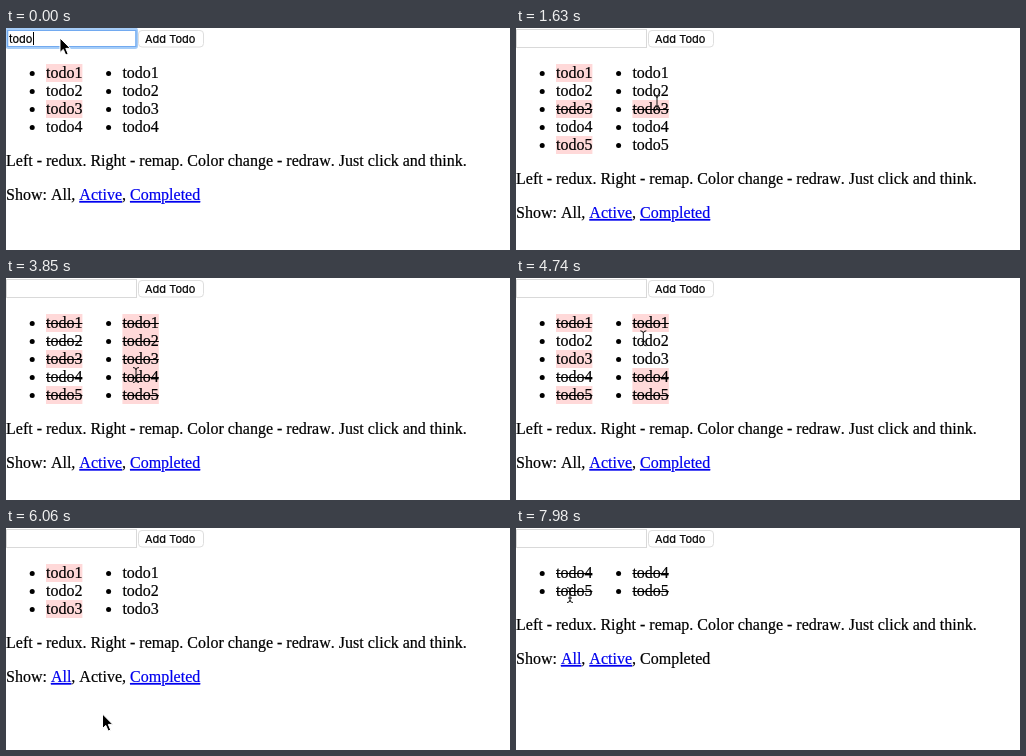
Write an HTML page that moves like this. It is 504 px wide and 222 px high and loops after 8000 ms.

```html
<!DOCTYPE html>
<html lang="en">
<head>
<meta charset="utf-8">
<title>Todo lists</title>
<style>
  html, body { margin: 0; width: 100%; height: 100%; overflow: hidden; background: #fff; }
  svg { display: block; width: 504px; height: 222px; }
  text { font: 16px "Liberation Serif", serif; font-kerning: none; stroke: #000; stroke-width: .2px; }
  .ui { font: 11px Inter, sans-serif; }
  .link { fill: #00e; stroke: #00e; text-decoration: underline; }
</style>
</head>
<body>
<svg id="stage" viewBox="0 0 504 222"></svg>
<script>
const LOOP = 8000, TICK = 147.7;
const ROW = 18, LIST_TOP = 36, ITEM_WIDTH = 36.4;
const COLUMNS = [40, 116.4];

// Moments below are counted in ticks.
const TYPED = 2, ADDED = 4, SHOW_ACTIVE = 41, SHOW_COMPLETED = 49;
const FIRST_CLICK = 11, CLICK_GAP = 3.4, CLICKS = 8;
const POINTER_STOPS = [
  { at: 5, x: 54, y: 10 },      // input
  { at: 9, x: 173, y: 48 },
  { at: 11, x: 141, y: 75 },    // todo3
  { at: 18, x: 133, y: 50 },    // todo1
  { at: 20, x: 130, y: 115 },   // todo5
  { at: 23, x: 130, y: 115 },
  { at: 26, x: 130, y: 97 },    // todo4
  { at: 35, x: 126, y: 42 },    // todo1
  { at: 37, x: 122, y: 198 },
  { at: 41, x: 96.5, y: 186 },  // Active
  { at: 42, x: 96.5, y: 186 },
  { at: 49, x: 167, y: 155 },   // Completed
  { at: 50, x: 167, y: 155 },
  { at: 54, x: 54, y: 67 }
];

const rect = (x, y, w, h, fill, extra = "") =>
  `<rect x="${x}" y="${y}" width="${w}" height="${h}" fill="${fill}" ${extra}/>`;
const text = (x, y, content, cls = "") => `<text x="${x}" y="${y}" class="${cls}">${content}</text>`;

// The clicks climb the right list at a steady pace and wrap from todo1 to todo5.
function clickedIds(tick) {
  const count = Math.floor((tick - FIRST_CLICK) / CLICK_GAP) + 1;
  return Array.from({ length: Math.max(0, Math.min(CLICKS, count)) }, (_, k) => 5 - (k + 2) % 5);
}

function stateAt(tick) {
  const clicks = clickedIds(tick);
  const filter = tick >= SHOW_COMPLETED ? "Completed" : tick >= SHOW_ACTIVE ? "Active" : "All";
  const renders = 4 + (tick >= ADDED) + clicks.length + (filter !== "All");
  const items = [];
  for (let id = 1; id <= (tick >= ADDED ? 5 : 4); id++) {
    const done = clicks.filter(clicked => clicked === id).length % 2 === 1;
    if (filter !== "All" && done !== (filter === "Completed")) continue;
    const fresh = filter === "Completed";
    // The left list redraws every item each time, the right one only the toggled item.
    items.push({ id, done, tinted: [!fresh && (renders - id) % 2 === 1, !fresh && done] });
  }
  return { filter, items };
}

function drawForm(tick) {
  const focused = tick < FIRST_CLICK;
  const value = tick >= ADDED ? "" : tick >= TYPED ? "todo5" : "todo";
  const caret = Math.floor(3 + 6.2 * value.length);
  const field = focused
    ? rect(1, 1, 129.5, 18.5, "#fff", 'rx="1.5" stroke="#a6cdf8" stroke-width="3"') +
      rect(1.5, 2.5, 128.5, 16, "none", 'stroke="#72aaf0"')
    : rect(.5, 1.5, 130, 18, "#fff", 'stroke="#d9d9d9"');
  return field + text(3, 15, value, "ui") +
    (focused ? rect(caret, 4, 1, 13, "#000") : "") +
    rect(132.5, 2.5, 65, 16.5, "#fff", 'rx="3.5" stroke="#dedede"') +
    text(139, 15, "Add Todo", "ui");
}

function drawItem({ id, done, tinted }, row) {
  const top = LIST_TOP + row * ROW;
  return COLUMNS.map((x, column) =>
    (tinted[column] ? rect(x, top, ITEM_WIDTH, ROW, "#ffd9d9") : "") +
    `<circle cx="${x - 13.8}" cy="${top + 9.5}" r="2.5"/>` +
    text(x, top + 14, "todo" + id) +
    (done ? rect(x, top + 9, ITEM_WIDTH, 1, "#000") : "")).join("");
}

function drawFooter(filter, listBottom) {
  const links = ["All", "Active", "Completed"]
    .map(name => name === filter ? name : `<tspan class="link">${name}</tspan>`).join(", ");
  return text(0, listBottom + 30, "Left - redux. Right - remap. Color change - redraw. Just click and think.") +
    text(0, listBottom + 64, "Show: " + links);
}

function pointerAt(tick) {
  const next = POINTER_STOPS.findIndex(stop => stop.at >= tick);
  const to = POINTER_STOPS[next], from = POINTER_STOPS[next - 1] ?? to;
  const k = to === from ? 1 : (tick - from.at) / (to.at - from.at);
  return [from.x + (to.x - from.x) * k, from.y + (to.y - from.y) * k];
}

function drawPointer(tick, listBottom) {
  const [x, y] = pointerAt(tick);
  const overItem = y >= LIST_TOP && y < listBottom && COLUMNS.some(left => x >= left && x <= left + ITEM_WIDTH);
  const overSentence = y >= listBottom + 16 && y < listBottom + 34;
  const shape = overItem || overSentence
    ? '<path d="M-3-7.5Q0-7.5 0-5V5Q0 7.5 3 7.5M3-7.5Q0-7.5 0-5M0 5Q0 7.5-3 7.5M-2 3H2" fill="none" stroke="#111"/>'
    : '<path d="M0 0V14.5L3.3 11.4 5.7 17 8.2 16 5.8 10.4H10.3Z" stroke="#fff"/>';
  return `<g transform="translate(${x} ${y})">${shape}</g>`;
}

const stage = document.getElementById("stage");
let shownTick = -1;

function frame() {
  const tick = Math.floor((performance.now() % LOOP + 2) / TICK);
  if (tick !== shownTick) {
    shownTick = tick;
    const { filter, items } = stateAt(tick);
    const listBottom = LIST_TOP + items.length * ROW;
    stage.innerHTML = drawForm(tick) + items.map(drawItem).join("") +
      drawFooter(filter, listBottom) + drawPointer(tick, listBottom);
  }
  requestAnimationFrame(frame);
}
frame();
</script>
</body>
</html>
```
